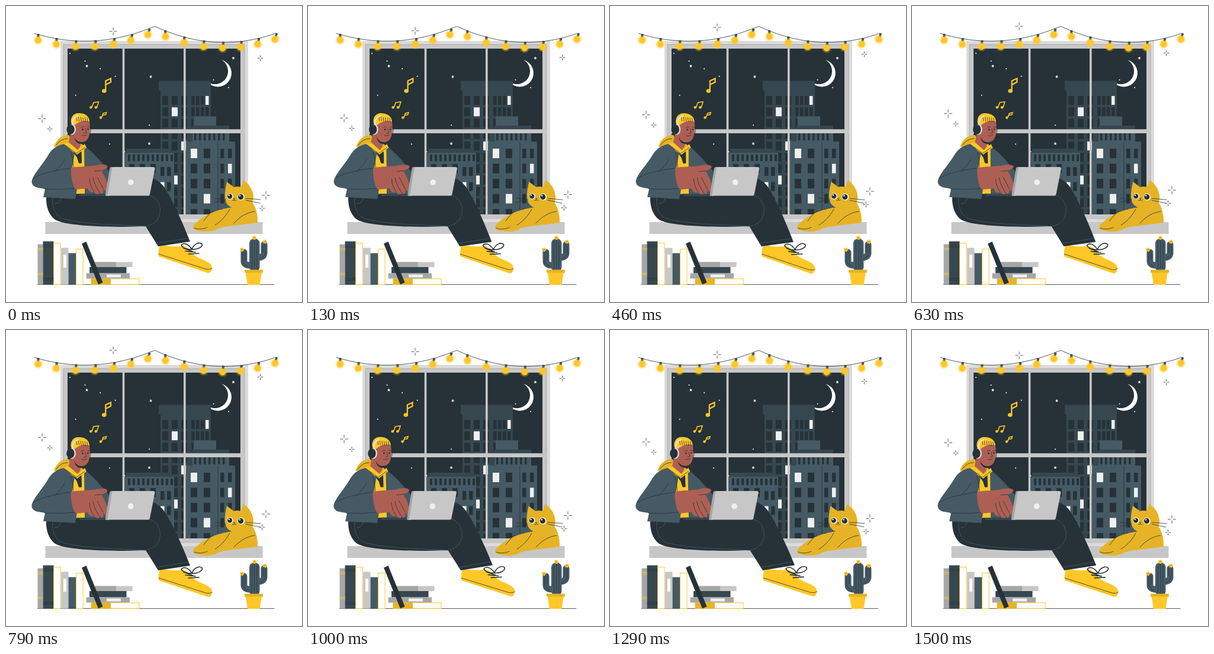
These frames come from a looping animation (500 px wide and 500 px high, 1.54 s). An HTML page:

```html
<!DOCTYPE html>
<html lang="en">
<head>
<meta charset="utf-8">
<title>Night at the window</title>
<style>
  html, body { margin: 0; width: 100%; height: 100%; overflow: hidden; background: #fff }
  svg { display: block; width: 100vw; height: 100vh }
  .dark { fill: #263238 } .slate { fill: #37474f } .steel { fill: #455a64 }
  .gold { fill: #ffc727 } .amber { fill: #e5b325 } .skin { fill: #ae5f54 }
  .pale { fill: #dbdbdb } .gray { fill: #c7c7c7 } .mid { fill: #a6a6a6 }
  .lit { fill: #f0f0f0 } .white { fill: #fff }
  .page { fill: #fff; stroke: #ffc727 }
  .line { fill: none; stroke: #263238; stroke-width: .8; stroke-linecap: round; stroke-linejoin: round }
  .seam { fill: none; stroke: #455a64; stroke-width: .9 }
  .arm { fill: none; stroke: #455a64; stroke-width: 11; stroke-linecap: round }
  #notes { fill: #ffc727; stroke: #ffc727; stroke-width: 1.6 }
  #notes path { fill: none }
</style>
</head>
<body>
<svg viewBox="0 0 500 500">
  <defs>
    <radialGradient id="glow">
      <stop offset=".55" stop-color="#ffc727" stop-opacity=".6"/>
      <stop offset="1" stop-color="#ffc727" stop-opacity="0"/>
    </radialGradient>
  </defs>

  <!-- window and sky -->
  <path class="pale" d="M92 59H409V366H92z"/>
  <path class="gray" d="M97 65H403V360H97z"/>
  <path class="dark" d="M104 72H396V352H104z"/>
  <path class="line" opacity=".3" d="M97 360V65H403V360"/>
  <g id="stars" class="white"></g>
  <path class="white" d="M364 91A23.2 23.2 0 1 1 339 127A22 22 0 1 0 364 91z"/>
  <g id="city"></g>
  <path class="gray" d="M196.700 72h3.600v280h-3.600zM300 72h3.600v280h-3.600zM98 208.300H403v6.700H98z"/>
  <path class="gray" d="M66.500 365H433.500V385H66.500z"/>
  <g id="lights"></g>
  <g id="sparkles" class="line"></g>

  <!-- music -->
  <g id="notes">
    <ellipse cx="165.800" cy="143.500" rx="3" ry="2.400"/>
    <path stroke-width="2.200" d="M168.300 143V126.500L177 122.500V128.500L168.300 133"/>
    <circle cx="143.300" cy="171.300" r="1.500"/><circle cx="151.800" cy="171.300" r="1.500"/>
    <path d="M145 171L148 163L156.500 162L153.600 171"/>
    <circle cx="160" cy="188.500" r="1.400"/>
    <path d="M161.800 188L164 181.500L169.500 180L168.500 183.500L163.500 184.500"/>
  </g>

  <!-- cat -->
  <path class="amber" d="M384 340C362 342 338 350 319 368C314 374 316 378 322 379C334 382 350 382 358 376L368 373L425 366C426 350 420 334 412 326z"/>
  <path class="line" d="M378 343C370 358 360 366 353 370M350 346C342 352 338 358 334 363M420 347C405 349 394 357 385 367M318 375C325 378 333 377 340 374"/>
  <g id="catHead">
    <path class="amber" d="M373 297L385 306Q391 304 397 306L401 294C409 299 417 309 418 321C419 334 410 343 396 343C381 343 371 337 370 325C369 315 371 307 373 297z"/>
    <g id="catEyes"></g>
    <path class="line" d="M384 325h3L385.500 327C385 329 383 329 382 328M385.500 327C386 329 388 329 389 328M352 325L371 327M352 332Q362 328 371 329M405 325L430 327M405 328L429 333"/>
  </g>

  <!-- person -->
  <g id="leg">
    <path class="white" d="M259 399L307 392L309 409L261 408z"/>
    <path class="gold" d="M261 402.500C270 406 288 407 298 405C306 406 310 412 316 419C325 428 341 429 347 438C349 445 347 451 341 451L258 423Q256 413 261 402.500z"/>
    <path class="line" d="M258 419L338 444.500Q344 446 348 443"/>
    <path class="line" stroke-width="1.600" style="stroke-width:1.600" d="M314 411C307 400 299 400 296 404C298 409 308 412 314 411C317 402 326 398 331 402C333 407 323 412 314 411M300 409L316 415M303 414L320 416M308 419L326 418"/>
    <path class="dark" d="M200 318L246 291C256 293 265 301 271 312C287 340 300 370 311 398L257 406L234 369z"/>
    <path class="seam" d="M253 401L309 392"/>
  </g>
  <path class="dark" d="M68 321C67 338 72 353 83 361C98 370 150 373 200 373L236 372C254 369 262 354 260 340C258 325 249 318 235 318z"/>
  <path class="seam" d="M79 324C77 342 85 357 99 360C138 370 190 369 236 372C255 369 262 354 260 340C257 326 248 320 238 319M93 325Q91 334 82 334"/>

  <g id="body">
    <path class="steel" d="M131 235C147 247 162 264 174 279L171 318H116z"/>
    <path class="gold" d="M108 240L132 236L133 317H116z"/>
    <path class="dark" d="M113 246L121 250L127.500 244L128 265Q123 268 119 261z"/>
    <path class="gold" d="M113 246L120 256L126 276H115z"/>
    <path class="amber" d="M81 238C84 226 95 217 106 218L116 233H128L134 238L120 248L100 235Q92 239 81 238z"/>
    <path class="gold" d="M97 233C103 230 108 232 112 236L121 244L133 233L136 239L120 251z"/>
    <path class="line" d="M85 235Q92 224 104 224M100 235L119 249L133 239"/>
    <path class="steel" d="M98 233C84 236 76 243 70 254C60 270 50 280 45 291C41 299 45 305 54 307L66 309L63 323L117 326L120 309L112 272L116 249z"/>
    <path class="line" d="M46 291C61 282 86 277 109 274M65 309Q92 311 118 308M82 280Q95 268 99 259M110 247Q114 260 114 272"/>
    <g id="head">
      <path class="skin" d="M112 195L141 194C142 203 143 212 140 220C138 227 133 230 127 230L125 238L121 243L106 230z"/>
      <path class="dark" d="M115 221Q119 230 128 230L126 233Q117 232 115 221z"/>
      <path class="gold" d="M110 198C108 187 115 180 124 181C134 181 141 187 141 195Q126 191 114 203z"/>
      <g id="ribs" class="line"></g>
      <path fill="none" stroke="#e0e0e0" stroke-width="2.500" d="M113 202C111 192 116 187 122 185"/>
      <ellipse class="pale" cx="111.500" cy="208.500" rx="6.500" ry="9"/>
      <ellipse class="dark" cx="109" cy="208.500" rx="6.700" ry="8.300"/>
      <path class="line" d="M142 204Q145 210 141.500 216M127 205Q129 203 132 204M137 204L141 204M134 207L136 214L132 215M128 219Q132 220 136 218"/>
      <circle class="dark" cx="129.500" cy="208.500" r="1.400"/><circle class="dark" cx="138.500" cy="208" r="1.300"/>
    </g>
    <path class="slate" d="M123 317H172V321H124z"/>
    <path class="skin" d="M110 273C124 271 137 271 147 270C156 268 166 266 171 270C173 273 167 276 161 278C166 285 172 300 174 309C174 314 170 315 167 312L164 308C166 316 162 319 159 316C156 319 151 318 149 314C144 316 140 314 138 308L118 310C112 304 109 284 110 273z"/>
    <path class="line" d="M150 279L161 278M154 289L164 308M147 290Q150 305 159 316M141 292Q142 305 149 314"/>
  </g>
  <g id="laptop">
    <path class="mid" d="M178 272H184L174 321H170Q167 321 168 318L175 275Q175.500 272 178 272z"/>
    <path class="gray" d="M181 272H248Q252 272 251.500 275L243 318Q242.500 320.500 240 320.500H171.500L179 274Q179.500 272 181 272z"/>
    <circle class="lit" cx="210.800" cy="297.800" r="4.800"/>
  </g>

  <!-- books and cactus -->
  <path class="line" d="M53 470.500H453"/>
  <g id="books"></g>
  <path class="dark" d="M128 401.500L135.500 398L163.500 467L156 470.500z"/>
  <path class="arm" d="M402 416V431Q402 438 413 438M436 403V418Q435 425 425 425"/>
  <rect class="steel" x="411" y="393" width="17.500" height="56" rx="8"/>
  <path class="line" d="M400 416V431Q401 437 408 440M404 415V429M434 402V416M438 402V418Q436 425 429 427"/>
  <g id="cactus"></g>
  <path class="gold" d="M404.500 449H432L428.500 471H408z"/>
  <path class="amber" d="M403 445.500H434V450.500H403z"/>
</svg>
<script>
const $ = id => document.getElementById(id);
const repeat = (n, fn) => Array.from({ length: n }, (_, i) => fn(i)).join('');
const rect = (x, y, w, h, cls) => `<rect class="${cls}" x="${x}" y="${y}" width="${w}" height="${h}"/>`;
const circle = (x, y, r, cls) => `<circle class="${cls}" cx="${x}" cy="${y}" r="${r}"/>`;
const line = d => `<path class="line" d="${d}"/>`;

// Sky: small dots scattered by the golden ratio, plus a few pointed stars
function star([x, y]) {
  const points = repeat(10, i => {
    const a = i * Math.PI / 5, r = i % 2 ? 1.2 : 2.9;
    return `${x + r * Math.sin(a)},${y - r * Math.cos(a)} `;
  });
  return `<polygon points="${points}"/>`;
}
$('stars').innerHTML = [[136.5, 101.5], [244.5, 119.5], [384, 88], [242, 232.5]].map(star).join('') +
  repeat(16, i => circle(108 + 284 * (i * .618 % 1), 80 + 185 * (i * .414 % 1), 1, ''));

// A grid of windows; lit holds "column,row" keys
const panes = (x, dx, cols, w, y, dy, rows, h, lit = []) => repeat(cols, c => repeat(rows, r => {
  const top = y + r * dy;
  return rect(x + c * dx, top, w, Math.min(h, 352 - top), lit.includes(`${c},${r}`) ? 'lit' : 'dark');
}));
const tower = rect(258, 126.5, 88, 16, 'slate') + rect(261, 142, 85, 210, 'slate') +
  panes(264, 16, 3, 10, 152, 19.2, 11, 15, ['1,1', '2,4', '1,7']) +
  panes(313, 8, 4, 5.5, 152, 19.2, 3, 15, ['3,0']);
const rightBlock = rect(317, 186.5, 38, 15.5, 'steel') +
  rect(315, 202, 62, 28, 'slate') + rect(315, 213, 62, 16, 'steel') + panes(318, 8, 7, 3.5, 214, 0, 1, 13) +
  rect(304, 229, 83, 123, 'steel') + rect(357.5, 229, .8, 123, 'dark') +
  panes(312, 22, 2, 11, 241, 25.5, 5, 16, ['0,0', '1,3']) +
  panes(362, 13, 2, 6.5, 241, 25.5, 5, 16, ['1,1']);
const leftBlock = rect(203, 241, 77, 8, 'slate') + rect(201, 248, 83, 104, 'steel') +
  panes(206, 8, 10, 4, 251, 0, 1, 11) +
  panes(208, 18, 3, 9, 267, 25.5, 4, 15) + panes(261, 11, 2, 6.5, 272, 25.5, 4, 15, ['0,1']);
$('city').innerHTML = tower + rightBlock + leftBlock;

// String lights hang from two parabolas meeting above the window
const wire = x => x < 250 ? 59.3 - .0018 * (x - 133) ** 2 : 61.5 - .002 * (x - 368) ** 2;
const bulb = i => {
  const x = 54 + 30.77 * i + 4.2 * Math.sin(2 * Math.PI * (i - .5) / 13) ** 2, y = wire(x) + 9.5;
  const tilt = Math.atan(wire(x + 1) - wire(x)) * -25 + 8;
  return `<g transform="rotate(${tilt} ${x} ${y})">` +
    rect(x - 2, y - 10.5, 4, 6, 'slate') + `<circle cx="${x}" cy="${y}" r="9" fill="url(#glow)"/>` +
    circle(x, y, 5.4, 'gold') + '</g>';
};
$('lights').innerHTML = line('M' + repeat(103, i => `${48 + 4 * i - 2 * (i > 101)} ${wire(48 + 4 * i)} `)) + repeat(14, bulb);

$('sparkles').innerHTML = [[181, 38.5, 6], [61, 186, 6.5], [74, 203.3, 4], [429.5, 83.7, 4.5],
  [439, 315.3, 6.5], [432.5, 337.5, 4.5]].map(([x, y, r]) => {
    const gap = r * .35, n = r - gap;
    return line(`M${x - r} ${y}h${n}M${x + gap} ${y}h${n}M${x} ${y - r}v${n}M${x} ${y + gap}v${n}`);
  }).join('');

const eye = (x, y, r) => circle(x, y, r, 'white') + circle(x - .4, y, r * .8, 'dark') + circle(x - r / 3, y - r / 3, 1.2, 'white');
$('catEyes').innerHTML = eye(378.5, 321.5, 5.2) + eye(397, 322.5, 5.8);
$('ribs').innerHTML = repeat(6, i => line(`M${119 + 3.6 * i} ${187 + .4 * i}l1 7`));

// Books: one upright row, then a pile
let edge = 53.5;
const upright = [['mid', 9, 68], ['slate', 18, 73], ['page', 12.5, 70], ['gray', 12.5, 62], ['steel', 13, 53], ['page', 12.5, 60]]
  .map(([cls, w, h]) => {
    const x = edge;
    edge += w;
    return rect(x, 470.5 - h, w - (cls === 'page'), h, cls);
  }).join('');
const bands = repeat(4, i => rect(53.5, (i < 2 ? 409 : 446) + 2.5 * i, 9, 1, 'gold') +
  line(`M63 ${(i < 2 ? 404 : 454) + 3 * i}h17`));
const pile = rect(145, 432.5, 68.5, 8.5, 'gray') + rect(145, 432.5, 41, 8.5, 'mid') +
  rect(141, 441, 62.5, 10.5, 'slate') + rect(135.5, 451.5, 73.5, 9, 'mid') + rect(170, 453.5, 24, 5, 'lit') +
  rect(144, 460.8, 81, 9.5, 'page') + rect(144, 460.5, 33, 10, 'amber');
$('books').innerHTML = upright + bands + rect(97, 420, 5, 22, 'white') + pile;

const flower = ([x, y]) => repeat(5, i => circle(x + 2.2 * Math.cos(i * 1.257), y + 2 * Math.sin(i * 1.257), 1.5, 'gold')) +
  `<circle cx="${x}" cy="${y}" r="1.2" fill="#e88a25"/>`;
$('cactus').innerHTML = repeat(3, i => line(`M${415.5 + 4.2 * i} ${398 - 2 * (i === 1)}V444`)) +
  [[419.5, 391.5], [398.5, 411.5], [437.5, 398]].map(flower).join('');

const LOOP = 1540;
const move = (id, value) => $(id).setAttribute('transform', value);

function draw() {
  const now = performance.now();
  const turn = shift => 2 * Math.PI * (now + shift) / LOOP;
  const sway = Math.sin(turn(0));
  move('sparkles', `translate(0 ${4.5 * Math.cos(turn(50))})`);
  move('notes', `translate(${.6 * sway} 0)`);
  move('body', `rotate(${.5 * sway} 100 322)`);
  move('head', `rotate(${.7 * sway} 113 235)`);
  move('laptop', `translate(${.8 * sway} 0)`);
  move('leg', `rotate(${.75 * sway} 250 310)`);
  move('catHead', `rotate(${.8 * sway} 395 345)`);
  requestAnimationFrame(draw);
}
draw();
</script>
</body>
</html>
```
